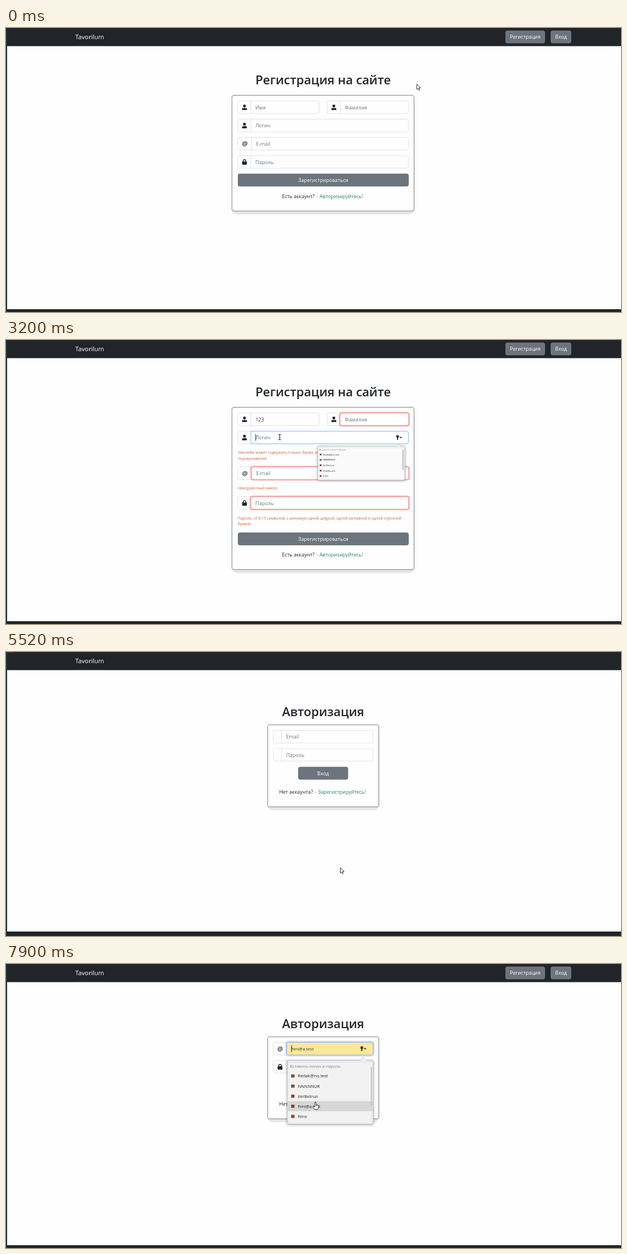
Write an HTML page with a canvas that moves like this. It is 1101 px wide and 509 px high and loops after 8000 ms.

```html
<!DOCTYPE html>
<html lang="ru">
<head>
<meta charset="utf-8">
<title>Регистрация</title>
<style>
html, body { margin: 0; width: 100%; height: 100%; overflow: hidden; background: #fefefe; }
canvas { display: block; }
</style>
</head>
<body>
<canvas id="stage" width="1101" height="509"></canvas>
<script>
const ctx = document.getElementById('stage').getContext('2d');
const LOOP = 8000;
const DARK = '#212529', GRAY = '#6c757d', GREEN = '#2b8460', LINE = '#dee2e6', BLUE = '#86b7fe';
const BODY = 8.95;
const ACCOUNTS = ['Redak@no.test', 'NNNNNUR', 'IlerBetrun', 'fiml@a.test', 'fimo'];

// Screen refresh bursts: [first, last], eight updates each
const BURSTS = [[130, 1130], [1280, 2270], [2390, 3350], [3470, 4400],
  [4520, 5520], [5640, 6630], [6780, 7750], [7900, 7900]];

// Pointer path: [time, x, y]
const PATH = [[130, 735, 100], [880, 593, 271], [1130, 590, 270], [1400, 590, 268],
  [2200, 488, 174], [2527, 488, 174], [2664, 492, 143], [3075, 494, 144], [3213, 490, 174],
  [3603, 492, 174], [3869, 640, 144], [4001, 676, 157], [4400, 818, 190], [4520, 818, 196],
  [5200, 598, 386], [5640, 598, 386], [6500, 566, 152], [6780, 566, 152], [7100, 557, 199],
  [7340, 557, 199], [7473, 556, 217], [7611, 556, 219], [7750, 555, 235], [7900, 554, 247]];

function held(t) {
  let out = 0;
  for (const [a, b] of BURSTS) {
    if (t < a) break;
    const step = (b - a) / 7 || 1;
    out = Math.min(b, a + Math.floor((t + 20 - a) / step) * step);
  }
  return out;
}

function pointerAt(t) {
  let prev = PATH[0];
  for (const next of PATH) {
    if (t < next[0]) {
      if (next === prev) break;
      const k = (t - prev[0]) / (next[0] - prev[0]);
      const e = k * k * (3 - 2 * k);
      return [prev[1] + (next[1] - prev[1]) * e, prev[2] + (next[2] - prev[2]) * e];
    }
    prev = next;
  }
  return [prev[1], prev[2]];
}

const within = (t, a, b) => t >= a && t < b;
const typed = (t, times) => '123'.slice(0, times.filter(s => t >= s).length);

function rect(x, y, w, h, fill) {
  ctx.fillStyle = fill;
  ctx.fillRect(x, y, w, h);
}

function box(x, y, w, h, r, fill, stroke, lw = 1) {
  ctx.beginPath();
  ctx.roundRect(x, y, w, h, r);
  if (fill) { ctx.fillStyle = fill; ctx.fill(); }
  if (stroke) { ctx.strokeStyle = stroke; ctx.lineWidth = lw; ctx.stroke(); }
}

function text(str, x, cy, size, color, align = 'left', weight = 400) {
  ctx.font = `${weight} ${size}px "Open Sans", "Noto Sans", sans-serif`;
  ctx.textAlign = align;
  ctx.fillStyle = color;
  ctx.fillText(str, x, cy + size * 0.36);
  return ctx.measureText(str).width;
}

function poly(points, fill, stroke, lw = 1) {
  ctx.beginPath();
  points.forEach(([x, y]) => ctx.lineTo(x, y));
  if (fill) { ctx.closePath(); ctx.fillStyle = fill; ctx.fill(); }
  if (stroke) { ctx.strokeStyle = stroke; ctx.lineWidth = lw; ctx.stroke(); }
}

function dot(x, y, r, fill) {
  ctx.beginPath();
  ctx.arc(x, y, r, 0, 7);
  ctx.fillStyle = fill;
  ctx.fill();
}

const icons = {
  user(x, y) {
    dot(x, y - 2.4, 2.5, DARK);
    box(x - 4.5, y + 0.9, 9, 4, [3.5, 3.5, 0.8, 0.8], DARK);
  },
  tie(x, y) {
    icons.user(x, y);
    poly([[x - 2, y + 0.9], [x, y + 3.2], [x + 2, y + 0.9]], null, '#fff', 0.8);
    poly([[x - 0.8, y + 1], [x + 0.8, y + 1], [x + 0.9, y + 4], [x - 0.9, y + 4]], DARK);
  },
  at(x, y) { text('@', x, y - 0.2, 11.4, DARK, 'center', 600); },
  lock(x, y) {
    box(x - 2.4, y - 4.2, 4.8, 6, 2.4, null, DARK, 1.4);
    box(x - 4.3, y - 0.9, 8.6, 5.8, 1.2, DARK);
  },
  key(x, y) {
    dot(x, y - 1.8, 2.5, DARK);
    rect(x - 0.9, y, 1.8, 4.6, DARK);
    dot(x, y - 2.6, 0.6, '#fff');
    poly([[x + 4, y - 0.8], [x + 5.8, y + 0.9], [x + 7.6, y - 0.8]], null, DARK, 1.2);
  }
};

function button(label, x, y, w, h = 23) {
  box(x, y, w, h, 4, GRAY);
  text(label, x + w / 2, y + h / 2, BODY, '#fff', 'center');
}

function card(x, y, w, h) {
  box(x, y + 10, w + 0.5, h - 4.5, 10, '#e5e5e5');
  box(x + 0.5, y + 0.5, w - 1, h - 1, 3.5, '#fefefe', '#7b8187');
}

function field(o) {
  const { x, y, w, sep = 23.5, icon, hint, value, red = 0, focus, glow, fill, caret } = o;
  const h = 22.5, fx = x + sep, fw = w - sep, cy = y + h / 2;
  box(x, y, w, h, 3.5, '#fefefe', LINE);
  poly([[fx, y], [fx, y + h]], null, LINE);
  if (icon) icons[icon](x + sep / 2 + 0.2, cy);
  if (red) {
    box(fx - 0.5, y, fw + 1, h, 3.5, null, `rgba(250,130,130,${0.35 * red})`, 4.5);
    box(fx - 0.5, y, fw + 1, h, 3, '#fff', '#f08a8a', 1.2);
  } else if (focus) {
    if (glow) box(fx, y, fw, h, 3.5, null, '#c3dbff', 5.5);
    box(fx, y, fw, h, [0, 3.5, 3.5, 0], fill || '#fff', BLUE);
  } else if (fill) {
    box(fx, y, fw, h, [0, 3.5, 3.5, 0], fill, LINE);
  }
  const tx = fx + 8;
  const size = fill ? 7.65 : BODY;
  const tw = text(value || hint, tx, cy + 0.4, size, value ? '#30353a' : '#6f747a');
  if (focus && caret) rect(tx + (value && !fill ? tw : 0), cy - 6, 1, 12, '#111');
}

function popup(x, y, w, s, keyX, sel = -1) {
  if (s <= 0) return;
  s = Math.min(1, s);
  const h = 114.5 * s;
  ctx.save();
  ctx.shadowColor = 'rgba(0,0,0,.3)';
  ctx.shadowBlur = 4;
  ctx.shadowOffsetY = 1;
  const fill = s < 1 ? '#fafafa' : '#f2f2f2';
  box(x, y, w, h, 2.5, fill, '#bdbdbd', 0.8);
  ctx.restore();
  poly([[keyX - 6 * s, y + 0.6], [keyX, y - 6 * s], [keyX + 6 * s, y + 0.6]], fill);
  poly([[keyX - 6 * s, y], [keyX, y - 6 * s], [keyX + 6 * s, y]], null, '#c4c4c4', 0.8);
  if (sel >= 0) rect(x + 0.5, y + 19 + sel * 18.1, w - 1, 18, '#d7d7d7');
  ctx.save();
  ctx.translate(x, y);
  ctx.scale(s, s);
  text('Вставить логин и пароль', 5, 11.3, 7.4, '#858585');
  ACCOUNTS.forEach((name, i) => {
    const cy = 28.2 + i * 18.1;
    rect(7, cy - 2.8, 6, 5.6, '#7d4a38');
    text(name, 19, cy, 7.7, '#222');
  });
  ctx.restore();
  box(x + w - 4.5, y + 12 * s, 2.4, 69 * s, 1.2, '#c6c6c6');
}

function chrome(loading) {
  rect(0, 0, 1101, 509, '#fefefe');
  rect(0, 0, 1101, 32.5, DARK);
  const foot = loading ? 501 : 504;
  rect(0, foot, 1101, 509 - foot, DARK);
  rect(0, 0, 2, 509, '#17353b');
  text('Tavorilum', 124, 16.3, 11.2, '#fff');
  if (loading) {
    rect(0, 0, 15, 1, '#57471f');
  } else {
    button('Регистрация', 894, 4.5, 71);
    button('Вход', 975, 4.5, 37);
  }
}

function prompt(question, link, x, linkX, cy) {
  text(question, x, cy, BODY, DARK);
  text(link, linkX, cy, BODY, GREEN);
}

function submitButton(y, t) {
  if (within(t, 960, 2380)) box(415, y, 306, 22.5, 4, null, '#bcd6fd', 5.5);
  if (within(t, 840, 1200)) {
    box(415.5, y + 0.5, 305, 22, 4, '#e7e7e7', t > 960 ? '#8db9f5' : '#cfd2d5');
    text('Зарегистрироваться', 567.7, y + 11.5, BODY, '#555b61', 'center');
  } else {
    button('Зарегистрироваться', 415, y, 306);
  }
}

function signUp(t) {
  const bad = t >= 1100;
  const red = bad ? (t < 1250 ? 0.75 : 1.3) : 0;
  const first = typed(t, [2790, 2930, 3070]);
  const last = typed(t, [3990, 4130, 4260]);
  const login = typed(t, [3465, 3600, 3730]);
  const onLogin = within(t, 2385, 2650) || within(t, 3200, 3860);
  const onFirst = within(t, 2650, 3200);
  const onLast = t >= 3860;
  const mark = (value, focus) => value || focus ? 0 : red;

  text('Регистрация на сайте', 567.7, 93, 22, DARK, 'center', 600);
  card(404, 120, 327, bad ? 292 : 208.5);
  field({ x: 415, y: 130.8, w: 145.5, icon: 'tie', hint: 'Имя', value: first, focus: onFirst,
    red: mark(first, onFirst), caret: true });
  field({ x: 575, y: 130.8, w: 145.5, icon: 'tie', hint: 'Фамилия', value: last, focus: onLast,
    red: mark(last, onLast), caret: true });
  field({ x: 415, y: 163.5, w: 305.5, icon: 'user', hint: 'Логин', value: login, focus: onLogin,
    red: mark(login, onLogin), caret: true });
  if (onLogin) icons.key(701, 174.5);
  field({ x: 415, y: bad ? 227.5 : 196.2, w: 305.5, sep: 24.7, icon: 'at', hint: 'E-mail', red });
  field({ x: 415, y: bad ? 280.8 : 228.8, w: 305.5, icon: 'lock', hint: 'Пароль', red });
  submitButton(bad ? 345 : 261, t);
  prompt('Есть аккаунт?', '- Авторизируйтесь!', 494, 556, bad ? 385 : 301.5);

  if (bad) {
    const note = (str, cy) => text(str, 415, cy, 6.7, '#d0653c');
    note('Никнейм может содержать только: буквы латинского алфавита, цифры и знаки', 202);
    note('подчеркивания', 212.7);
    note('Некорректный имейл', 266);
    note('Пароль: от 8-15 символов, с минимум одной цифрой, одной заглавной и одной строчной', 319.3);
    note('буквой.', 330);
  }
  if (onLogin && !login) {
    const s = Math.min(1, (t - (t < 3000 ? 2390 : 3080)) / 250);
    popup(558, 186 + 8 * s, 156, s, 703);
  }
}

function pickedRow(t) {
  return [7100, 7400, 7650, 7800].filter(s => t >= s).length - 1;
}

function signIn(t, loading) {
  const focus = t >= 6600;
  const row = pickedRow(t);
  const fill = row >= 0 ? '#ffe997' : null;
  const sep = loading ? 15 : 23.8;

  text('Авторизация', 567.7, 107.3, 22, DARK, 'center', 600);
  card(468, 130, 200, 148);
  field({ x: 478.5, y: 173, w: 178.5, sep, icon: loading ? null : 'lock', hint: 'Пароль', fill });
  field({ x: 478.5, y: 140.5, w: 178.5, sep: focus ? sep + 0.5 : sep, icon: loading ? null : 'at',
    hint: 'Email', value: ACCOUNTS[row], focus, glow: true, fill,
    caret: Math.floor(t / 530) % 2 === 0 });
  button('Вход', 523, 205.8, 89.5);
  prompt('Нет аккаунта?', '- Зарегистрируйтесь!', 489, 553, 251);
  if (focus) {
    icons.key(637, 151.5);
    const s = Math.min(1, (t - 6640) / 250);
    popup(503.5, 164 + 8.5 * s, 154, s, 640, row);
  }
}

function pointer(x, y, kind) {
  ctx.save();
  ctx.translate(x, y);
  ctx.lineJoin = 'round';
  if (kind === 'beam') {
    poly([[-2.5, -5], [0, -4.5], [2.5, -5]], null, '#222');
    poly([[0, -4.5], [0, 4.5]], null, '#222', 1.2);
    poly([[-2.5, 5], [0, 4.5], [2.5, 5]], null, '#222');
  } else if (kind === 'hand') {
    poly([[-1, 0.8], [0, 0], [1, 0.8], [1.2, 5], [3, 5], [5, 6], [5.6, 7.5], [5, 11.5], [4, 14],
      [-1, 14], [-4.5, 9], [-4.5, 7.8], [-3, 7.8], [-1, 9.5], [-1, 0.8]], '#fff', '#333');
    poly([[1.2, 5], [1.2, 8]], null, '#333', 0.8);
    poly([[3.2, 5.5], [3.2, 8]], null, '#333', 0.8);
  } else {
    poly([[0.5, 0.5], [0.5, 10.2], [2.7, 8.2], [4.2, 11.6], [5.8, 10.9], [4.3, 7.6], [7.2, 7.4],
      [0.5, 0.5]], '#fff', '#333');
  }
  ctx.restore();
}

function pointerKind(t, x, y) {
  if (t < 5450) {
    if (within(t, 840, 1100) || within(t, 5170, 5450)) return 'hand';
    const overRow = within(y, 164, 186) && within(x, 439, 720);
    const overNames = within(y, 131, 153) && (within(x, 439, 560) || within(x, 599, 720));
    return overRow || overNames ? 'beam' : 'arrow';
  }
  if (pickedRow(t) >= 0) return 'hand';
  return within(y, 141, 163) ? 'beam' : 'arrow';
}

function draw(t) {
  const auth = t >= 5450;
  const loading = auth && t < 5640;
  chrome(loading);
  if (auth) signIn(t, loading);
  else signUp(t);
  const [x, y] = pointerAt(t);
  pointer(x, y, pointerKind(t, x, y));
}

const start = performance.now();
function tick() {
  draw(held((performance.now() - start) % LOOP));
  requestAnimationFrame(tick);
}
tick();
</script>
</body>
</html>
```
